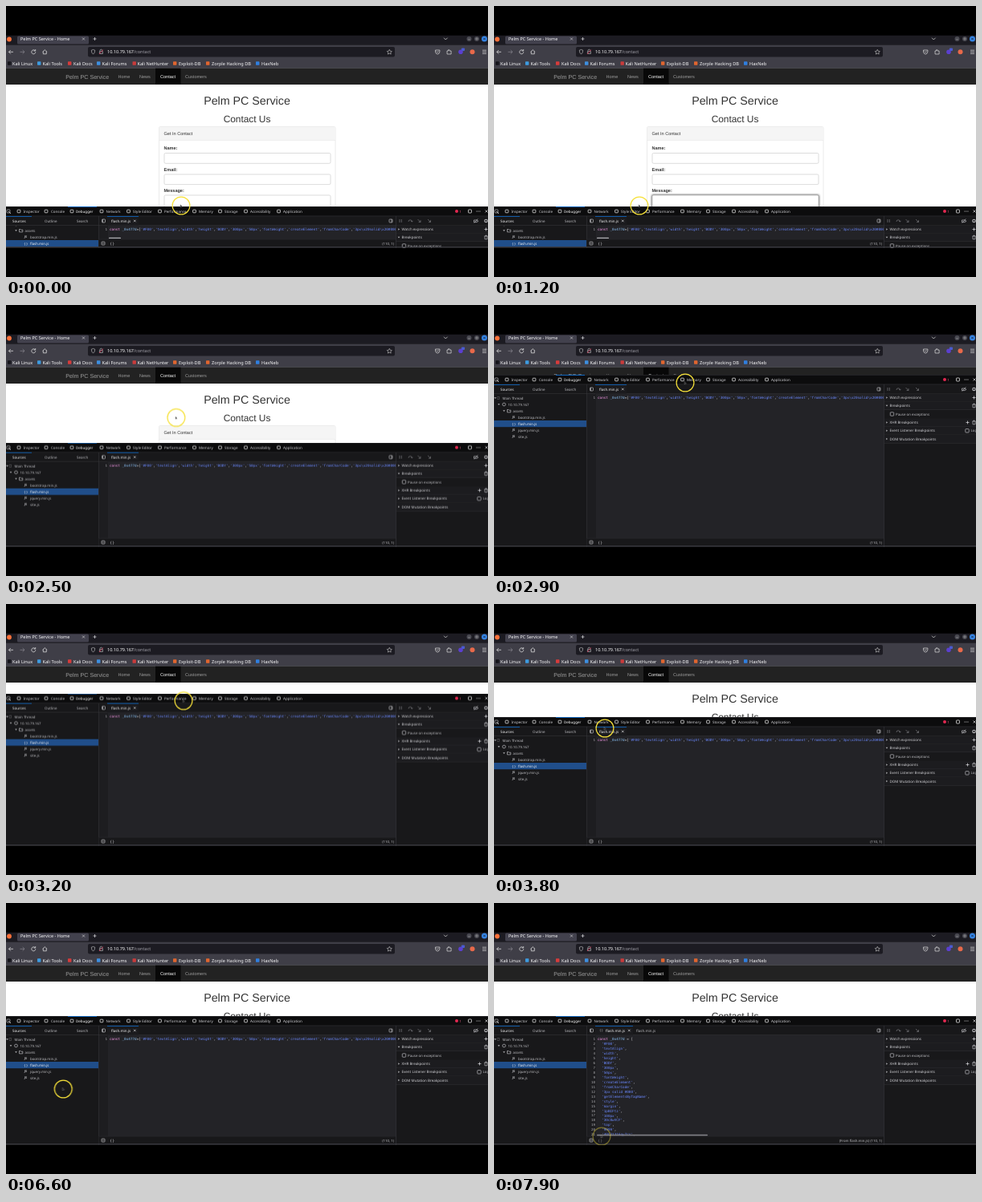
These frames come from a looping animation (600 px wide and 338 px high, 8 s). An HTML page:

```html
<!DOCTYPE html>
<html lang="en">
<head>
<meta charset="utf-8">
<title>Debugger walkthrough</title>
<style>
  html, body { margin: 0; width: 100%; height: 100%; overflow: hidden; background: #000; }
  #stage { display: block; width: 100vw; height: 100vh; }
  text { white-space: pre; text-rendering: geometricPrecision; }
  .ui { font-family: "Noto Sans", "Open Sans", sans-serif; }
  .page { font-family: "Liberation Sans", Arial, sans-serif; }
  .mono { font-family: "DejaVu Sans Mono", monospace; }

  #panel, #tree, #cursor, #ring, #glow { animation: 8s linear infinite; }
  #panel { animation-name: panel; }
  #tree { animation-name: tree; }
  #cursor { animation-name: cursor; }
  #ring { animation-name: ring; }
  #glow { animation-name: glow; }
  .raw { animation: raw 8s step-end infinite; }
  .pretty { animation: pretty 8s step-end infinite; }
  .thumb { animation: thumb 8s step-end infinite; }
  .treethumb { animation: treethumb 8s step-end infinite; }

  @keyframes panel {
    0%, 25.6% { transform: translateY(250px); }
    28.75%, 29.5% { transform: translateY(235px); }
    31.25% { transform: translateY(172px); }
    33.75% { transform: translateY(104px); }
    35%, 36.9% { transform: translateY(87px); }
    43.75%, 100% { transform: translateY(141px); }
  }
  @keyframes tree {
    0%, 29.5% { transform: translateY(-15px); }
    30.2%, 100% { transform: translateY(0); }
  }
  @keyframes cursor {
    0%, 1% { transform: translate(218px, 249px); }
    5.6% { transform: translate(126px, 288px); }
    11.25% { transform: translate(232px, 160px); }
    13.2% { transform: translate(140px, 276px); }
    15%, 17% { transform: translate(181px, 249px); }
    23.75%, 26% { transform: translate(200px, 250px); }
    28.75%, 29.5% { transform: translate(199px, 184px); }
    33.75% { transform: translate(230px, 79px); }
    36.25%, 37% { transform: translate(238px, 97px); }
    43.75% { transform: translate(200px, 150px); }
    47.5%, 48.2% { transform: translate(138px, 155px); }
    51.25% { transform: translate(89px, 157px); }
    56.25% { transform: translate(194px, 158px); }
    58.75% { transform: translate(150px, 156px); }
    62% { transform: translate(16px, 194px); }
    65.5%, 67% { transform: translate(616px, 30px); }
    70% { transform: translate(444px, 153px); }
    78.75%, 81.25% { transform: translate(41px, 202px); }
    85%, 96% { transform: translate(131px, 291px); }
    98.75%, 100% { transform: translate(134px, 291px); }
  }
  @keyframes ring { 0%, 97.5% { opacity: 1; } 98.75%, 100% { opacity: .4; } }
  @keyframes glow { 0%, 9% { opacity: 0; } 11%, 17.5% { opacity: 1; } 23.75%, 100% { opacity: 0; } }
  @keyframes raw { 0% { opacity: 1; } 87.5%, 100% { opacity: 0; } }
  @keyframes pretty { 0% { opacity: 0; } 87.5%, 100% { opacity: 1; } }
  @keyframes thumb { 0% { opacity: 1; } 26.25%, 100% { opacity: 0; } }
  @keyframes treethumb { 0% { opacity: 0; } 27.5% { opacity: 1; } 30%, 100% { opacity: 0; } }
</style>
</head>
<body>
<svg id="stage" viewBox="0 0 600 338" preserveAspectRatio="none"></svg>
<script>
const BRAND = 'Pelm PC Service';
const GREY = '#bcbcc0', WHITE = '#f9f9fa', BLUE = '#0a84ff', EDGE = '#38383d';

// y is the vertical middle of the capitals
const text = (x, y, s, size = 4.5, fill = GREY, attrs = '') =>
  `<text x="${x}" y="${(y + size * .36).toFixed(2)}" font-size="${size}" fill="${fill}" ${attrs}>${s}</text>`;
const rect = (x, y, w, h, fill, attrs = '') =>
  `<rect x="${x}" y="${y}" width="${w}" height="${h}" fill="${fill}" ${attrs}/>`;
const dot = (x, y, r, fill, attrs = '') =>
  `<circle cx="${x}" cy="${y}" r="${r}" fill="${fill}" ${attrs}/>`;
const line = (d, stroke = GREY, width = .7) =>
  `<path d="${d}" fill="none" stroke="${stroke}" stroke-width="${width}"/>`;
const cross = (x, y, r = 1.5, stroke = GREY) =>
  line(`M${x - r} ${y - r}l${2 * r} ${2 * r}m0 ${-2 * r}l${-2 * r} ${2 * r}`, stroke, .6);
const plus = (x, y, r = 2) => line(`M${x - r} ${y}h${2 * r}m${-r} ${-r}v${2 * r}`, '#e0e0e4');
const trash = (x, y) => line(`M${x - 2} ${y - 1.5}h4m-3.5 0v3.8h3v-3.8m-2 0v-1h1v1`);
const box = (x, y, w = 4, h = 4, stroke = GREY) =>
  rect(x - w / 2, y - h / 2, w, h, 'none', `rx=".7" stroke="${stroke}" stroke-width=".7"`);
const arrow = (x, y, open) =>
  `<path d="${open ? 'M-1.3 -.7h2.6l-1.3 1.7z' : 'M-.7 -1.3v2.6l1.7 -1.3z'}" transform="translate(${x} ${y})" fill="${GREY}"/>`;

function browserChrome() {
  const bookmarks = [
    [4, 8, 'Kali Linux', '#15151b'], [41, 45.5, 'Kali Tools', '#3d9be0'],
    [79, 84, 'Kali Docs', '#d83b3b'], [115, 119.5, 'Kali Forums', '#3d8fe0'],
    [159.5, 163.5, 'Kali NetHunter', '#c93b3b'], [210, 215, 'Exploit-DB', '#e0652f'],
    [251, 256, 'Zorple Hacking DB', '#e0652f'], [313, 318, 'HaxNeb', '#2f7fe0']];
  return `<g class="ui">
    ${rect(0, 36.5, 600, 12, '#1c1b22')}
    ${rect(14, 37.5, 89, 10, '#42414d', 'rx="1.5"')}
    ${dot(4, 41.5, 2.9, '#ff7139')}
    ${text(18, 41.5, BRAND + ' - Home', 5.5, WHITE)}
    ${cross(96.5, 41, 1.5, '#ddd')}${plus(110.5, 41)}
    ${line('M545 39.7l2.3 2.3l2.3 -2.3', '#ddd')}
    ${dot(576.5, 41, 3, '#4a4a52')}${dot(586, 41, 3, '#4a4a52')}
    ${line('M575.3 41.8h2.4', '#aaa', .6)}${box(586, 41, 2, 2, '#aaa')}
    ${dot(595.5, 41, 3.5, '#3584e4')}${cross(595.5, 41, 1.2, '#111')}
    ${rect(0, 48.5, 600, 29, '#3f3e47')}
    ${rect(102, 51, 382, 12.5, '#1c1b22', 'rx="2"')}
    ${line('M9 57.3h-5.5m2.3 -2.3l-2.3 2.3l2.3 2.3', '#eee')}
    ${line('M17.5 57.3h5.5m-2.3 -2.3l2.3 2.3l-2.3 2.3', '#8b8a93')}
    ${line('M36 55.5a2.5 2.5 0 1 0 .8 1.8M36.7 54v2h-2', '#eee')}
    ${line('M45.5 57.3l2.8 -2.6l2.8 2.6m-4.8 -.5v3h4v-3', '#eee')}
    ${line('M106.3 55.2l2.2 -.8l2.2 .8q0 3.6 -2.2 4.9q-2.2 -1.3 -2.2 -4.9z', '#ccc', .6)}
    ${line('M117 56.8v-1.2a1.4 1.4 0 0 1 2.8 0v1.2m-3.4 0h4v2.7h-4z', '#ccc', .6)}
    ${line('M116 60l5 -5.5', '#e22850', .7)}
    ${text(126, 57.3, '10.10.79.167<tspan fill="#a3a2aa">/contact</tspan>', 5.55, WHITE)}
    ${line('M477.3 54.3l.9 1.9l2.1 .3l-1.5 1.5l.4 2.1l-1.9 -1l-1.9 1l.4 -2.1l-1.5 -1.5l2.1 -.3z', '#ccc', .6)}
    ${line('M534.5 55h5.4v2q-.5 3 -2.7 3q-2.2 0 -2.7 -3zm1.3 1.5l1.4 1.4l1.4 -1.4', '#ddd')}
    ${line('M549 56h1.5v-1.2h1.6v1.2h2v4h-5z', '#ddd')}
    ${dot(566, 57.3, 2.8, '#5b3fd0')}${rect(567, 52.5, 4, 3.5, '#4a5bd0', 'rx=".8"')}
    ${dot(580.5, 57.3, 3, '#e8694a')}
    ${line('M593 55.2h5M593 57.3h5M593 59.4h5', '#ddd')}
    ${bookmarks.map(([ix, x, s, c]) => rect(ix - 2, 69.3, 4.4, 4.4, c, 'rx=".6"') + text(x, 71.7, s, 5.6, WHITE)).join('')}
  </g>`;
}

function webPage() {
  const ink = '#333', input = (y, h) => rect(197, y, 207, h, '#fff', 'rx="1.6" stroke="#c4c4c4" stroke-width=".6"');
  const label = (y, s) => text(196.5, y, s, 5.55, ink, 'font-weight="bold"');
  const nav = (x, s, c = '#9d9d9d') => text(x, 88, s, 5.55, c);
  return `<g class="page">
    ${rect(0, 77.5, 600, 224, '#fff')}
    ${rect(0, 77.5, 600, 20.5, '#222')}
    ${rect(186, 77.5, 31.5, 20, '#080808')}
    ${text(74.3, 88, BRAND, 7.13, '#9d9d9d')}
    ${nav(139.5, 'Home')}${nav(166, 'News')}${nav(192, 'Contact', '#fff')}${nav(223, 'Customers')}
    ${text(300, 118.3, BRAND, 14.26, ink, 'text-anchor="middle"')}
    ${text(300, 140.5, 'Contact Us', 11.88, ink, 'text-anchor="middle"')}
    ${rect(190.5, 150.5, 219.5, 160, '#fff', 'rx="1.6" stroke="#ddd" stroke-width=".6"')}
    ${rect(190.8, 150.8, 218.9, 16.2, '#f5f5f5')}${rect(190.8, 167, 218.9, .5, '#ddd')}
    ${text(196.5, 159, 'Get In Contact', 5.55, ink)}
    ${label(177, 'Name:')}${input(183.5, 12.8)}
    ${label(203.6, 'Email:')}${input(210, 12.6)}
    ${label(230, 'Message:')}${input(236, 40)}
    <g id="glow">${rect(197, 236, 207, 40, 'none', 'rx="1.6" stroke="#777" stroke-width="2.2" filter="url(#soft)"')}
    ${rect(197, 236, 207, 40, '#fff', 'rx="1.6" stroke="#aaa" stroke-width=".6"')}</g>
  </g>`;
}

const colour = s => s.replace(/'[^']*'?/g, '<tspan fill="#6b89ff">$&</tspan>')
  .replace('const', '<tspan fill="#ff9df0">$&</tspan>')
  .replace('_0x477d', '<tspan fill="#8fc8ff">$&</tspan>');

function codeViews() {
  const words = String.raw`#F00|textAlign|width|height|BODY|300px|50px|fontWeight|createElement|fromCharCode|3px\x20solid\x20#000|getElementsByTagName|style|margin|1pBIFtz|100px|30c8wVCF|top|9999|40C31316qyZcs`
    .split('|').map(w => `'${w}'`);
  const row = (n, s) => {
    const y = 28.6 + (n - 1) * 5.96;
    return text(126, y, n, 4.2, '#a8a8ac', 'text-anchor="end"') + text(129, y, colour(s), 4.3, '#d7d7db');
  };
  const lines = ['const _0x477d = [', ...words.map(w => `  ${w.replace(/\\x20/g, ' ')},`)];
  return `<svg x="115" y="24" width="369.5" height="300" viewBox="115 24 369.5 300" class="mono">
    <g class="raw">${row(1, 'const _0x477d=[' + words.join(','))}</g>
    <g class="pretty">${lines.map((s, i) => row(i + 1, s)).join('')}</g></svg>`;
}

function toolTabs() {
  const tabs = [[16, 21.5, 'Inspector'], [50, 56, 'Console'], [82, 87, 'Debugger'], [119, 124.5, 'Network'],
    [152.5, 158, 'Style Editor'], [191.5, 197, 'Performance'], [234.5, 240, 'Memory'],
    [266.5, 272, 'Storage'], [298.5, 304, 'Accessibility'], [339.5, 345, 'Application']];
  return rect(77, 0, 36, .7, BLUE) +
    box(3, 6) + line('M3 6l3 3', WHITE) +
    tabs.map(([ix, x, s], i) => box(ix, 6, 3.8, 3.6, WHITE) +
      text(x, 6, s, 4.5, i == 2 ? '#fff' : '#d0d0d4')).join('') +
    dot(561, 6, 2, '#e22850') + text(564.3, 6, '1', 4.3, '#e26080') + box(577.5, 6, 4, 4, WHITE) +
    [586, 588, 590].map(x => dot(x, 6, .5, WHITE)).join('') + cross(598, 6, 1.5, WHITE);
}

function sourceTree() {
  const file = (y, s) => text(22.8, y, 'JS', 3.8, '#c0c0c4', 'font-weight="bold"') + text(30, y, s, 4.4);
  return `<svg x="0" y="24" width="115" height="300" viewBox="0 24 115 300"><g id="tree">
    ${rect(0, 57, 115, 8.2, '#204e8a')}
    ${arrow(1.5, 29, true)}${text(3.5, 29, '▢', 4)}${text(10.5, 29, 'Main Thread', 4.4)}
    ${arrow(6, 37, true)}${dot(12.5, 37, 1.9, 'none', `stroke="${GREY}" stroke-width=".7"`)}${text(17.5, 37, '10.10.79.167', 4.4)}
    ${arrow(12.5, 45, true)}${line('M16.5 43.5h1.5l.6 .7h2.2v2.7h-4.3z')}${text(23.5, 45, 'assets', 4.4)}
    ${file(53, 'bootstrap.min.js')}
    ${text(22.5, 61, '{ }', 4.2, WHITE)}${text(30, 61, 'flash.min.js', 4.4, WHITE)}
    ${file(69, 'jquery.min.js')}${file(77, 'site.js')}
  </g>
  <g class="treethumb">${rect(113.4, 35, 1.3, 28, '#a0a0a4', 'rx=".6"')}</g></svg>`;
}

function sidePanes() {
  const head = (y, s, open) => rect(485.5, y - 5, 115, 10, '#1c1c1f') +
    rect(485.5, y + 5, 115, .4, EDGE) + arrow(489, y, open) + text(492.5, y, s, 4.5, '#d0d0d4');
  return head(28.5, 'Watch expressions') + plus(597.5, 28.5) +
    head(38.5, 'Breakpoints', true) + trash(597.5, 38.5) +
    box(495.5, 49, 4.4, 4.4) + text(500, 49, 'Pause on exceptions', 4.4) +
    head(59.5, 'XHR Breakpoints') + plus(589.5, 59.5) + trash(597.5, 59.5) +
    head(69.8, 'Event Listener Breakpoints') + box(589, 69.8, 4.4, 4.4) + text(593.5, 69.8, 'Log', 4.4) +
    head(80, 'DOM Mutation Breakpoints');
}

function devtools() {
  const activeTab = w => rect(126, 12.2, w, 11.3, '#1b1b1e') + rect(126, 12, w, .6, BLUE);
  return `<g id="panel" class="ui">
    ${rect(0, 0, 600, 330, '#18181a')}
    ${rect(0, 0, 600, 12, '#0c0c0d')}
    ${rect(0, 0, 600, .5, EDGE)}
    ${toolTabs()}
    ${rect(0, 11.7, 600, .5, EDGE)}${rect(0, 23.5, 600, .5, EDGE)}
    ${rect(0, 12, 32, .6, BLUE)}
    ${text(8, 18, 'Sources', 4.5, WHITE)}${text(48, 18, 'Outline')}${text(88, 18, 'Search')}
    ${sourceTree()}
    ${rect(115.5, 24, 370, 306, '#232327')}${rect(115.5, 24, 11.5, 306, '#1d1d20')}
    ${codeViews()}
    ${box(121.5, 18)}${line('M120.5 16v4')}${box(479, 18)}${line('M480 16v4')}
    <g class="raw">${activeTab(39)}
      ${text(131, 18, 'flash.min.js', 4.5, WHITE)}${cross(160.3, 18, 1.3, WHITE)}</g>
    <g class="pretty">${activeTab(47)}
      ${text(131.5, 18, '{ }', 4, GREY)}${text(139, 18, 'flash.min.js', 4.5, WHITE)}${cross(168.3, 18, 1.3, WHITE)}
      ${text(177, 18, 'flash.min.js')}</g>
    ${line('M490 16v4m2.3 -4v4M501 19a2.2 2.2 0 0 1 4.4 0m-1.3 -.8l1.3 1l1 -1.3M512.5 16l3.5 3.5m0 -2.4v2.4h-2.4M525 16l3.5 3.5m0 -2.4v2.4h-2.4', '#77777b')}
    ${line('M582.5 17h3.5l2 1.3l-2 1.3h-3.5zm.3 3.5l4.5 -5')}
    ${dot(597.5, 18, 1.7, 'none', `stroke="${GREY}" stroke-width="1.1"`)}
    ${sidePanes()}
    ${rect(115, 12, .5, 318, EDGE)}${rect(485, 12, .6, 318, EDGE)}
  </g>`;
}

function footer() {
  return `<g class="ui">
    ${rect(115.5, 290.8, 369.5, 11, '#18181a')}${rect(115.5, 290.8, 369.5, .4, EDGE)}
    ${box(121, 296)}${line('M119.5 296h3', GREY, .6)}
    <g class="raw">${text(129.7, 296, '{ }', 4.8, '#d0d0d4')}</g>
    <g class="pretty">${text(129.7, 296, '{ }', 4.8, '#77777b')}
      ${text(467, 296, '(From flash.min.js)', 4.3, GREY, 'text-anchor="end"')}
      ${rect(128, 288.8, 138, 1.5, '#85858a', 'rx=".7"')}</g>
    ${text(483, 296, '(110, 1)', 4.3, GREY, 'text-anchor="end"')}
    <g class="thumb">${rect(128, 288.8, 15, 1.2, '#b0b0b4', 'rx=".6"')}</g>
    ${rect(0, 300.3, 600, .9, '#45454c')}
  </g>`;
}

document.getElementById('stage').innerHTML = `
  <defs>
    <clipPath id="screen"><rect y="36.5" width="600" height="264.7"/></clipPath>
    <filter id="soft" x="-5%" y="-20%" width="110%" height="140%"><feGaussianBlur stdDeviation="1.1"/></filter>
  </defs>
  ${rect(0, 0, 600, 338, '#000')}
  <g clip-path="url(#screen)">
    ${webPage()}${browserChrome()}${devtools()}${footer()}
    <g id="cursor">
      <g id="ring">${dot(0, 0, 10.9, 'none', 'stroke="#f6e13a" stroke-width="1.2"')}</g>
      <path d="M-.9 -1.6v3.6l1 -.8h1.3z" fill="#111" stroke="#ddd" stroke-width=".25"/>
    </g>
  </g>`;
</script>
</body>
</html>
```
